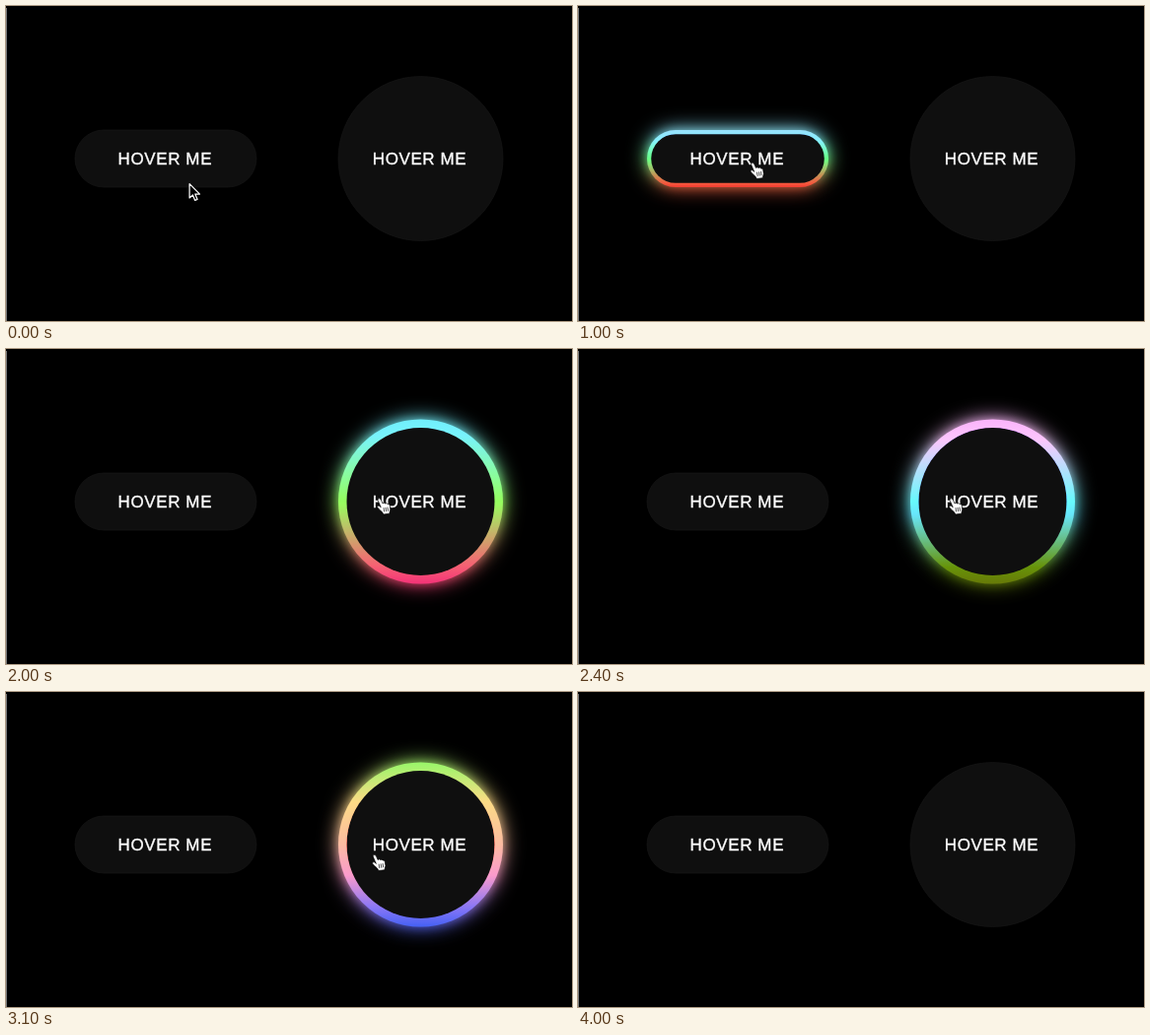
An HTML page for the animation above (4100 ms loop, 574x320 px).

```html
<!DOCTYPE html>
<html lang="en">
<head>
<meta charset="utf-8">
<title>Glowing buttons</title>
<style>
  html, body { margin: 0; width: 100%; height: 100%; overflow: hidden; background: #000; }
  svg { display: block; width: 574px; height: 320px; }
  text {
    font: 17px "Liberation Sans", Arial, sans-serif; letter-spacing: .6px;
    fill: #fff; stroke: #fff; stroke-width: .35px;
  }
  .base { fill: #0f0f0f; stroke: #191919; stroke-width: .6; }
  .ring { fill: url(#hue); }
  .near { filter: blur(5px); opacity: .45; }
  .far { filter: blur(10px); }
  .face { fill: #0f0f0f; }
</style>
</head>
<body>
<svg viewBox="0 0 574 320">
  <defs>
    <linearGradient id="hue" x1="0" y1="0" x2="0" y2="1">
      <stop offset="0" stop-color="#50ffe9"/>
      <stop offset=".5" stop-color="#dcf040"/>
      <stop offset="1" stop-color="#ff30d0"/>
    </linearGradient>
    <rect id="pill" x="70" y="126" width="184" height="58" rx="29"/>
    <circle id="disc" cx="420.5" cy="155" r="83.5"/>
  </defs>
  <rect width="574" height="320"/>
  <rect y="2" width="1" height="318" fill="#777"/>

  <use class="base" href="#pill"/>
  <g id="pillGlow">
    <use class="ring far" href="#pill"/>
    <use class="ring near" href="#pill"/>
    <use class="ring" href="#pill"/>
    <rect class="face" x="74.2" y="130.2" width="175.6" height="49.6" rx="24.8"/>
  </g>
  <text x="113.6" y="161">HOVER ME</text>

  <use class="base" href="#disc"/>
  <g id="discGlow">
    <use class="ring far" href="#disc"/>
    <use class="ring near" href="#disc"/>
    <use class="ring" href="#disc"/>
    <circle class="face" cx="420.5" cy="155" r="75"/>
  </g>
  <text x="371.8" y="161">HOVER ME</text>

  <g id="cursor">
    <path id="arrow" d="M.6.6V15L3.9 12 6.2 17.4 8.6 16.4 6.3 11.1H11Z"
      stroke="#fff" stroke-width="1.2" stroke-linejoin="round"/>
    <g id="hand" stroke="#000" stroke-width=".7" stroke-linecap="round" stroke-linejoin="round">
      <path fill="#fff" d="M1 2Q2-.5 4 1.5L6 6Q7.5 4.5 8.5 6 10 5 11 6.5 13 6 13.2 8
        L13.8 12 12.8 16.2 6.8 17Q6 14.5 2.5 12L.4 9.6Q.5 7.5 2.5 8.3L4 9.6Z"/>
      <path fill="none" d="M7 10.6L7.6 14M9 10.3L9.6 13.7M11 10L11.5 13.3"/>
    </g>
  </g>
</svg>
<script>
const LOOP = 4100, STEP = 100, HUE_TURN = 1500;
const $ = id => document.getElementById(id);

const glows = [
  { el: $("pillGlow"), on: 800, off: 1600 },
  { el: $("discGlow"), on: 1900, off: 3800 }
];
// pointer stops: time, x, y
const stops = [
  [0, 185.5, 180], [500, 177, 159], [1000, 174.5, 158.5], [1500, 231, 154.5],
  [2000, 376, 151], [2450, 376, 151], [3650, 367, 176], [LOOP, 366, 380]
];

function pointAt(t) {
  const i = stops.findIndex(s => s[0] > t);
  const [t0, x0, y0] = stops[i - 1], [t1, x1, y1] = stops[i];
  const k = (t - t0) / (t1 - t0);
  return [x0 + (x1 - x0) * k, y0 + (y1 - y0) * k];
}

function show(el, visible) {
  el.style.display = visible ? "" : "none";
}

function draw(t) {
  let hover = false;
  for (const { el, on, off } of glows) {
    const lit = t >= on && t < off;
    const hue = (t - on + 20) / HUE_TURN * 360;
    show(el, lit);
    el.style.filter = `hue-rotate(${hue}deg) saturate(.93)`;
    hover = hover || lit;
  }
  $("cursor").setAttribute("transform", `translate(${pointAt(t)})`);
  show($("hand"), hover);
  show($("arrow"), !hover);
}

const start = performance.now();
function tick() {
  const t = (performance.now() - start) % LOOP;
  draw(Math.floor(t / STEP) * STEP);
  requestAnimationFrame(tick);
}
tick();
</script>
</body>
</html>
```
